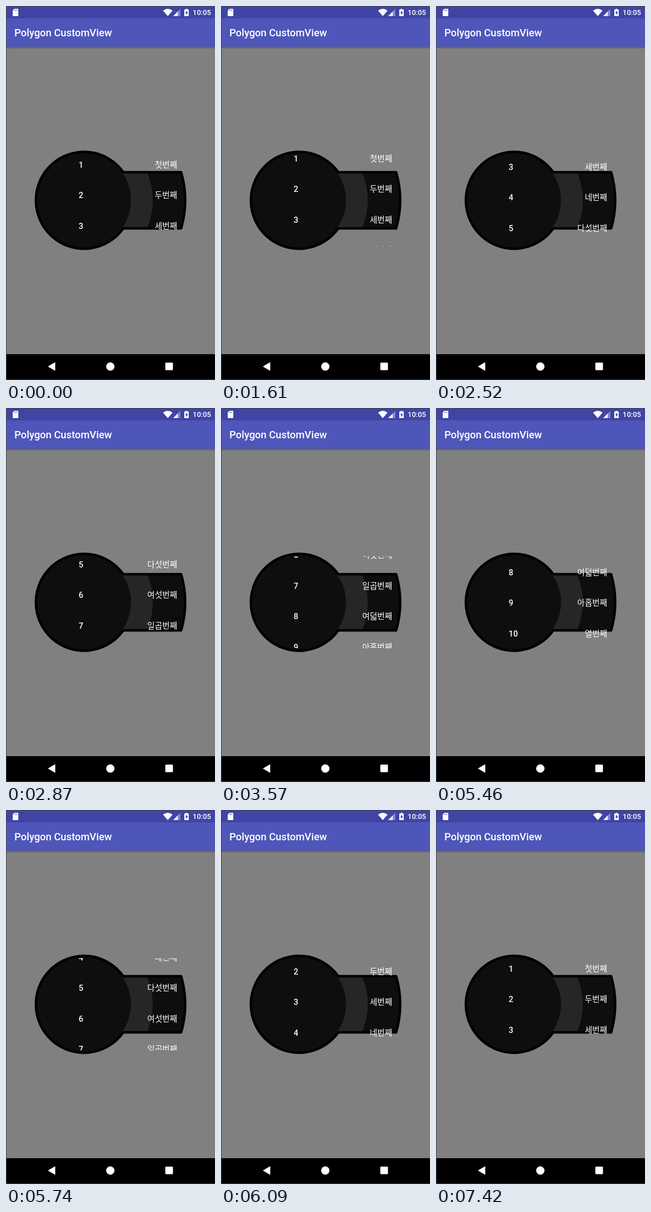
Animation of 374x666 px, one loop 7770 ms. Source, as an HTML page:

```html
<!DOCTYPE html>
<html lang="ko">
<head>
<meta charset="utf-8">
<title>Polygon CustomView</title>
<style>
  html, body { margin: 0; width: 100%; height: 100%; overflow: hidden; background: #808080; }
  svg { display: block; width: 374px; height: 666px; }
  text { fill: #fff; font-family: Roboto, 'Noto Sans CJK KR', 'Noto Sans CJK', sans-serif; font-weight: 500; }
  .title { font-size: 18.3px; }
  .clock { font-size: 13px; }
  #list text { font-size: 14.56px; }
  #list .name { font-family: 'Noto Sans CJK KR', 'Noto Sans CJK', sans-serif; text-anchor: end; }
</style>
</head>
<body>
<svg viewBox="0 0 374 666">
  <defs>
    <clipPath id="view"><rect x="100" y="264" width="230" height="164"/></clipPath>
    <clipPath id="tab"><rect x="205" y="296" width="120" height="100"/></clipPath>
    <linearGradient id="shade" x2="0" y2="1">
      <stop stop-color="#000" stop-opacity=".28"/>
      <stop offset="1" stop-color="#000" stop-opacity="0"/>
    </linearGradient>
  </defs>

  <rect width="374" height="666" fill="#808080"/>
  <rect width="374" height="22" fill="#4044a5"/>
  <rect y="22" width="374" height="50.700" fill="#4f56b9"/>
  <rect y="72.700" width="374" height="4" fill="url(#shade)"/>
  <rect y="620" width="374" height="46"/>
  <path d="M374 .5H.5V665.500H374" fill="none" stroke="#404040"/>

  <!-- status bar -->
  <g fill="#fff">
    <path d="M15 5h6q1 0 1 1v11q0 1-1 1h-8q-1 0-1-1V8z"/>
    <path d="M281 8.2Q289.500 2 298 8.200L289.500 18z"/>
    <path d="M312 5V18H299z" opacity=".35"/>
    <path d="M307.500 9.500V18H299z" opacity=".85"/>
    <path d="M321.500 5h3v1.300h2.500v11.700h-8V6.300h2.500z"/>
  </g>
  <path d="M324 8l-3.300 4.700h2V16l3.200-4.700h-1.900z" fill="#4044a5"/>
  <path d="M15.500 6.500v2.500M17.500 6.500v2.500M19.500 6.500v2.500" stroke="#4044a5" stroke-width=".8"/>
  <text class="clock" x="334" y="16">10:05</text>
  <text class="title" x="15" y="54">Polygon CustomView</text>

  <!-- dial with its tab -->
  <path id="body" fill="#0e0e0e"/>
  <g clip-path="url(#tab)">
    <circle cx="139.700" cy="346" r="123" fill="#262626"/>
    <circle cx="139.700" cy="346" r="84" fill="#0e0e0e"/>
  </g>
  <path id="edge" fill="none" stroke="#000" stroke-width="4.500" stroke-linejoin="round"/>

  <g clip-path="url(#view)"><g id="list"></g></g>

  <!-- navigation bar -->
  <g fill="#fff" stroke="#fff" stroke-linejoin="round" transform="translate(-.3 0)">
    <path d="M76 642L88 635V649z"/>
    <circle cx="187" cy="642" r="7"/>
    <rect x="286" y="635.500" width="12.500" height="12.500" rx=".5"/>
  </g>
</svg>
<script>
const LOOP = 7770, STEP = 70, ROW = 54.5;
const $ = id => document.getElementById(id);

const CX = 139.7, R = 86.2, TAB_R = 180.8, HALF = 50;
const reach = r => CX + Math.sqrt(r * r - HALF * HALF);
const outline = `M${reach(R)} 296A${R} ${R} 0 1 0 ${reach(R)} 396` +
  `H${reach(TAB_R)}A${TAB_R} ${TAB_R} 0 0 0 ${reach(TAB_R)} 296Z`;
$('body').setAttribute('d', outline);
$('edge').setAttribute('d', outline);

const names = '첫 두 세 네 다섯 여섯 일곱 여덟 아홉 열'.split(' ');
$('list').innerHTML = names.map((name, i) => {
  const y = 287.8 + i * ROW;
  return `<text x="130" y="${y}">${i + 1}</text>` +
    `<text class="name" x="306.3" y="${y}">${name}번째</text>`;
}).join('');

// Each swipe: start time, then the scroll offset at every step.
const swipes = [
  [1610, 11, 28, 42, 51, 55],
  [2380, 63, 81, 105, 134, 162, 187, 207, 222, 232, 237],
  [3430, 246, 266, 293, 325, 352, 372, 381],
  [5460, 371.5, 341.5, 293.5, 237.5, 183.5, 137.5, 101.5, 75.5, 59.5, 49.5, 45, 42.5],
  [6580, 1, 0]
];

function scrollAt(t) {
  let s = 0;
  for (const [start, ...offsets] of swipes) {
    if (t < start) break;
    s = offsets[Math.min(offsets.length - 1, Math.floor((t - start) / STEP))];
  }
  return s;
}

function draw(now) {
  $('list').setAttribute('transform', `translate(0 ${-scrollAt(now % LOOP)})`);
  requestAnimationFrame(draw);
}
draw(performance.now());
</script>
</body>
</html>
```
